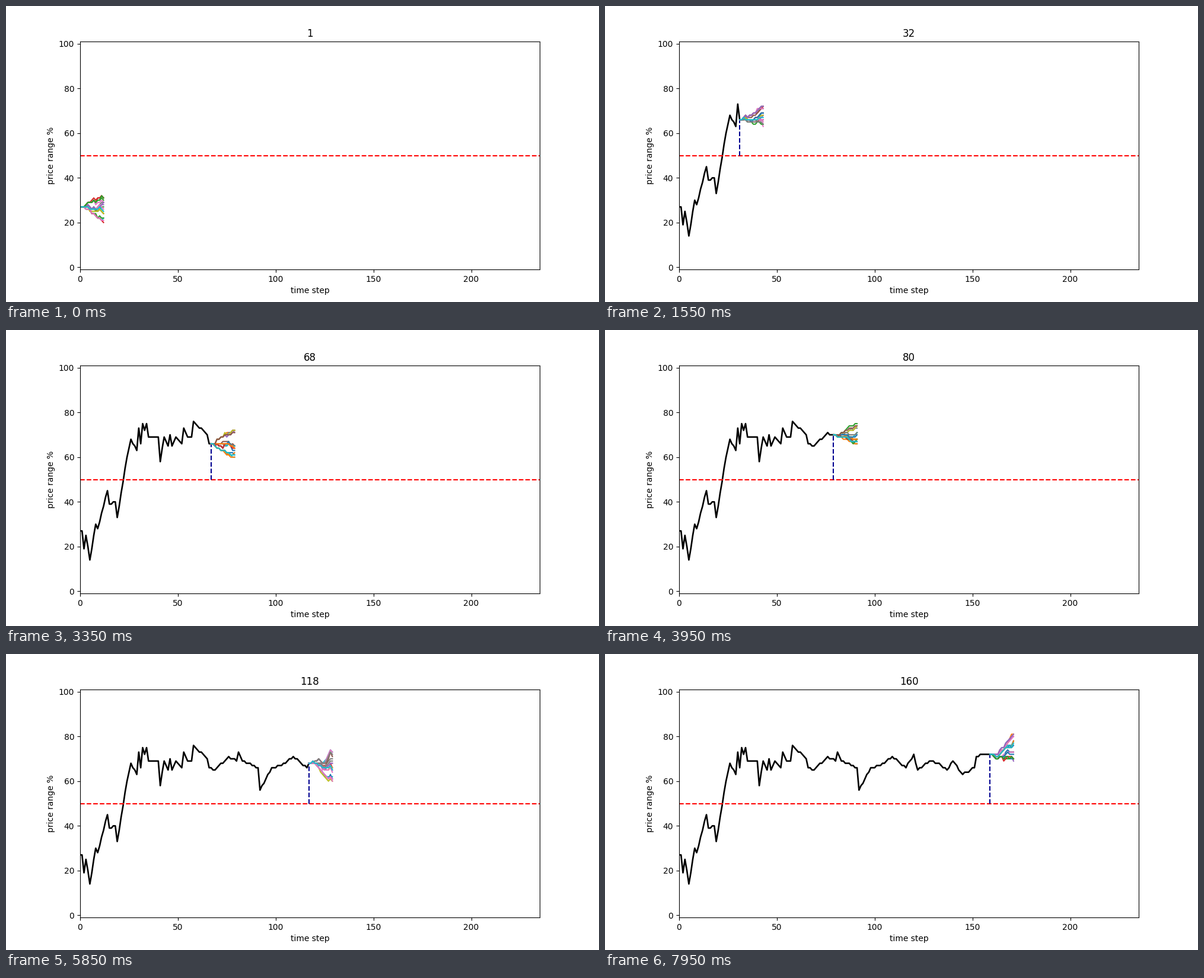
Write a matplotlib script that moves like this. It is 1000 px wide and 500 px high and loops after 8000 ms.

```python
import numpy as np
import matplotlib.pyplot as plt
from matplotlib.animation import FuncAnimation

STEPS = 160
HORIZON = 12
LIMIT = 50
TRUNKS = 4
TWIGS = 14

# Turning points (step, value) of the price; it runs straight between them.
TURNS = [
    (0, 27), (1, 27), (2, 19), (3, 25), (5, 14), (8, 30), (9, 28), (14, 45),
    (15, 39), (18, 40), (19, 33), (24, 60), (26, 68), (29, 63), (30, 73),
    (31, 66), (32, 75), (33, 72), (34, 75), (35, 69), (40, 69), (41, 58),
    (43, 69), (45, 65), (46, 70), (47, 65), (49, 69), (52, 66), (53, 73),
    (55, 69), (57, 69), (58, 76), (65, 70), (66, 66), (69, 65), (76, 71),
    (80, 69), (81, 73), (83, 69), (91, 66), (92, 56), (98, 66), (103, 67),
    (109, 71), (116, 66), (120, 72), (122, 65), (128, 69), (133, 68),
    (137, 65), (140, 69), (145, 63), (151, 66), (152, 71), (155, 72),
    (159, 72),
]
PRICE = np.round(np.interp(np.arange(STEPS), *zip(*TURNS)))


def forecast(n):
    """Coloured paths fanning out from step n, bottom path first."""
    rng = np.random.default_rng(500 + n)
    ahead = np.maximum(np.arange(HORIZON + 1) - 1, 0)
    shared = np.cumsum(rng.normal(0, 0.4, HORIZON + 1))
    ends = rng.permutation(np.linspace(-4, 4, TRUNKS))
    trunks = []
    for i, end in enumerate(ends):
        sway = shared + np.cumsum(rng.normal(0, 0.4, HORIZON + 1))
        sway -= sway[1]
        sway[0] = 0
        path = PRICE[n] + end * ahead / ahead[-1] + sway
        trunks.append((9 if i == 0 else rng.integers(0, 9), np.round(path)))

    twigs = []
    for i in range(TWIGS):
        path = trunks[i % TRUNKS][1].copy()
        fork = rng.integers(5, HORIZON)
        walk = np.cumsum(rng.integers(-1, 2, HORIZON + 1 - fork))
        path[fork:] += np.clip(walk, -1, 1)
        twigs.append((rng.integers(0, 10), path))
    return twigs + trunks[::-1]


fig, ax = plt.subplots(figsize=(10, 5), dpi=100)
# Keeps labels and lines from landing exactly between two pixels.
fig.subplots_adjust(left=0.1249, bottom=0.1099)
ax.set_xlim(0, 235)
ax.set_ylim(-1, 101)
ax.set_xlabel("time step")
ax.set_ylabel("price range %")
title = ax.set_title("1")

history, = ax.plot([], [], color="black", lw=1.9)
ax.axhline(LIMIT, color="red", ls="--", lw=1.5)
marker, = ax.plot([], [], color="#000090", ls="--", lw=1.5)
paths = [ax.plot([], [], lw=1.5)[0] for _ in range(TWIGS + TRUNKS)]


def update(n):
    title.set_text(str(n + 1))
    history.set_data(np.arange(n + 1), PRICE[:n + 1])
    marker.set_data([n, n], [LIMIT, PRICE[n]])
    marker.set_visible(n > 0)
    x = np.arange(n, n + HORIZON + 1)
    for line, (colour, y) in zip(paths, forecast(n)):
        line.set_data(x, y)
        line.set_color(f"C{colour}")
    return [title, history, marker, *paths]


anim = FuncAnimation(fig, update, frames=STEPS, interval=50,
                     repeat=True, repeat_delay=0, blit=False)
plt.show()
```
